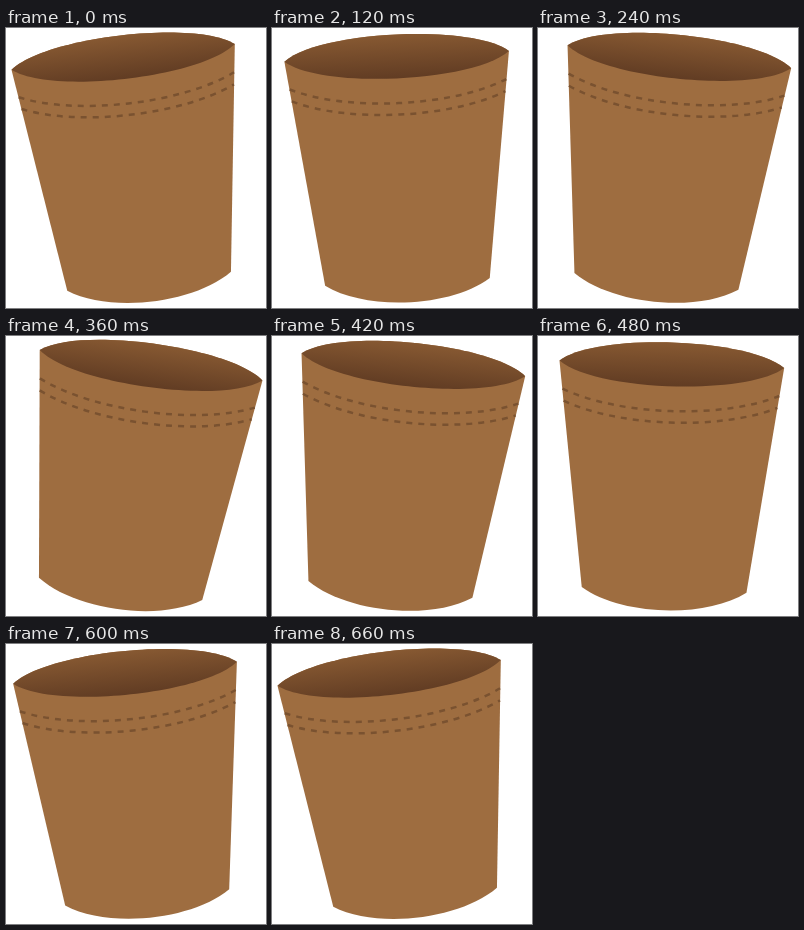
Animation of 260 by 280 pixels, one loop 690 ms. Source, as an HTML page:

```html
<!DOCTYPE html>
<html lang="en">
<head>
<meta charset="utf-8">
<title>Swaying pot</title>
<style>
html, body { margin: 0; width: 100%; height: 100%; overflow: hidden; background: #fff; }
svg { display: block; width: 100vw; height: 100vh; }
</style>
</head>
<body>
<svg viewBox="0 0 260 280">
  <defs>
    <linearGradient id="inside" x1="0" y1="0" x2="0" y2="1">
      <stop offset="0" stop-color="#875932"/>
      <stop offset="1" stop-color="#613c23"/>
    </linearGradient>
  </defs>
  <g id="pot">
    <path fill="#9e6d40" d="M-112.4-111.8C-76-140.8 76-140.8 112.4-111.8L82.4 114C42 141.3-42 141.3-82.4 114Z"/>
    <path fill="url(#inside)" d="M-112.4-111.8C-76-140.8 76-140.8 112.4-111.8C76-82.4-76-82.4-112.4-111.8Z"/>
    <g fill="none" stroke="#7a5230" stroke-width="2.5" stroke-dasharray="6 6">
      <path d="M-108.4-83.8C-53-58.7 53-58.7 108.4-83.8"/>
      <path d="M-106.9-71.8C-52-47.4 52-47.4 106.9-71.8"/>
    </g>
  </g>
</svg>
<script>
const pot = document.getElementById('pot');
const STEP = 30, LOOP = 690, HALF = 330;
const LEFT = -6.6, RIGHT = 8;

const ease = p => p < 0.5 ? 2 * p * p : 1 - 2 * (1 - p) ** 2;

// Sways right and back in 660 ms; the last step repeats the starting pose.
function draw(ms) {
  const t = Math.floor((ms % LOOP) / STEP) * STEP;
  const p = 1 - Math.abs(t - HALF) / HALF;
  const angle = LEFT + (RIGHT - LEFT) * ease(p);
  pot.setAttribute('transform', `translate(130 140) rotate(${angle.toFixed(3)})`);
}

const start = performance.now();
function tick(now) {
  draw(Math.max(0, now - start));
  requestAnimationFrame(tick);
}
draw(0);
requestAnimationFrame(tick);
</script>
</body>
</html>
```
